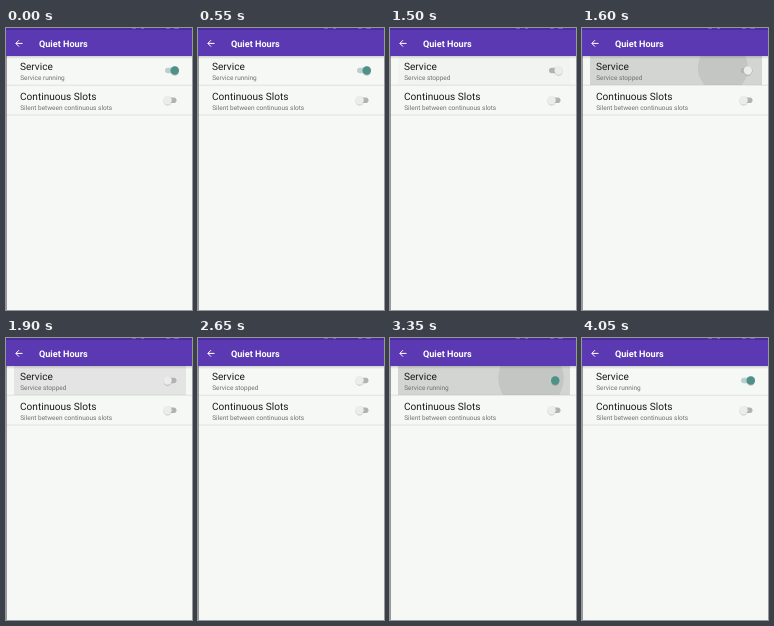
Write an HTML page that moves like this. It is 186 by 282 pixels and loops after 4100 ms.

```html
<!DOCTYPE html>
<html lang="en">
<head>
<meta charset="utf-8">
<style>
  html, body { margin: 0; width: 100%; height: 100%; overflow: hidden; background: #f6f8f6; }
  svg { display: block; font-family: Roboto, sans-serif; text-rendering: geometricPrecision; }
  .title { font-size: 10.1px; fill: #1c1c1c; }
  .note { font-size: 6.5px; fill: #707070; }
</style>
</head>
<body>
<svg width="186" height="282" viewBox="0 0 186 282">
  <defs>
    <clipPath id="row"><rect x="8" y="28" width="172" height="29"/></clipPath>
    <filter id="soft" x="-50%" y="-50%" width="200%" height="200%">
      <feDropShadow dx="0" dy=".5" stdDeviation=".7" flood-opacity=".4"/>
    </filter>
    <linearGradient id="shade" x2="0" y2="1">
      <stop stop-opacity=".16"/><stop offset="1" stop-opacity="0"/>
    </linearGradient>
  </defs>
  <rect width="186" height="282" fill="#f6f8f6"/>
  <path d="M.5 28V282" stroke="#999"/>
  <path d="M1 57.2H186M1 87H186" stroke="#dfe1df"/>

  <g clip-path="url(#row)">
    <rect id="press" x="8" y="28" width="172" height="29"/>
    <circle id="ripple" cx="141" cy="40"/>
  </g>

  <rect y="28" width="186" height="3" fill="url(#shade)"/>
  <rect width="186" height="28" fill="#5b39b2"/>
  <rect width="186" height="2" fill="#4a2d98"/>
  <path d="M126 .5h4m5 0h3m22 0h4m4 0h5" stroke="#8f7cc4" opacity=".6"/>
  <path d="M16.5 15.4H10M13 12.2 9.8 15.4 13 18.6" fill="none" stroke="#fff"/>
  <text x="33" y="18.9" font-size="9.1" font-weight="600" fill="#fff">Quiet Hours</text>

  <text class="title" x="14" y="42.2">Service</text>
  <text class="note" x="14.2" y="51.7" id="status"></text>
  <text class="title" x="14" y="72">Continuous Slots</text>
  <text class="note" x="14.2" y="81.5">Silent between continuous slots</text>

  <rect id="track" x="159" y="39.7" width="11.5" height="5.6" rx="2.8"/>
  <circle id="thumb" cy="42.5" r="4.2" filter="url(#soft)"/>
  <rect x="159" y="69.4" width="11.5" height="5.6" rx="2.8" fill="#b2b2b2"/>
  <circle cx="161.6" cy="72.2" r="4.2" fill="#ececec" filter="url(#soft)"/>
</svg>
<script>
const LOOP = 4100, TAP_OFF = 1470, TAP_ON = 3200;
const el = id => document.getElementById(id);
const set = (id, attrs) => {
  for (const name in attrs) el(id).setAttribute(name, attrs[name]);
};
const ramp = (t, from, to) => Math.min(1, Math.max(0, (t - from) / (to - from)));
const ease = p => p * p * (3 - 2 * p);

function draw(t) {
  const on = t < TAP_OFF || t >= TAP_ON;
  const age = t - (t < TAP_ON ? TAP_OFF : TAP_ON);
  const slide = ease(ramp(age, 0, 300));
  const position = t < TAP_OFF ? 1 : on ? slide : 1 - slide;

  el('status').textContent = on ? 'Service running' : 'Service stopped';
  set('thumb', { cx: 161.6 + 7.2 * position, fill: on ? '#4f9189' : '#ececec' });
  set('track', { fill: on ? '#b9d0cd' : '#b2b2b2' });

  const fade = 1 - ramp(age, 250, 550);
  set('press', { opacity: 0.14 * ramp(age, 20, 130) * fade });
  set('ripple', {
    r: 180 * ramp(age, 20, 400) ** 1.6,
    opacity: 0.07 * ramp(age, 20, 100) * fade
  });
}

function tick() {
  draw(performance.now() % LOOP);
  requestAnimationFrame(tick);
}
tick();
</script>
</body>
</html>
```
